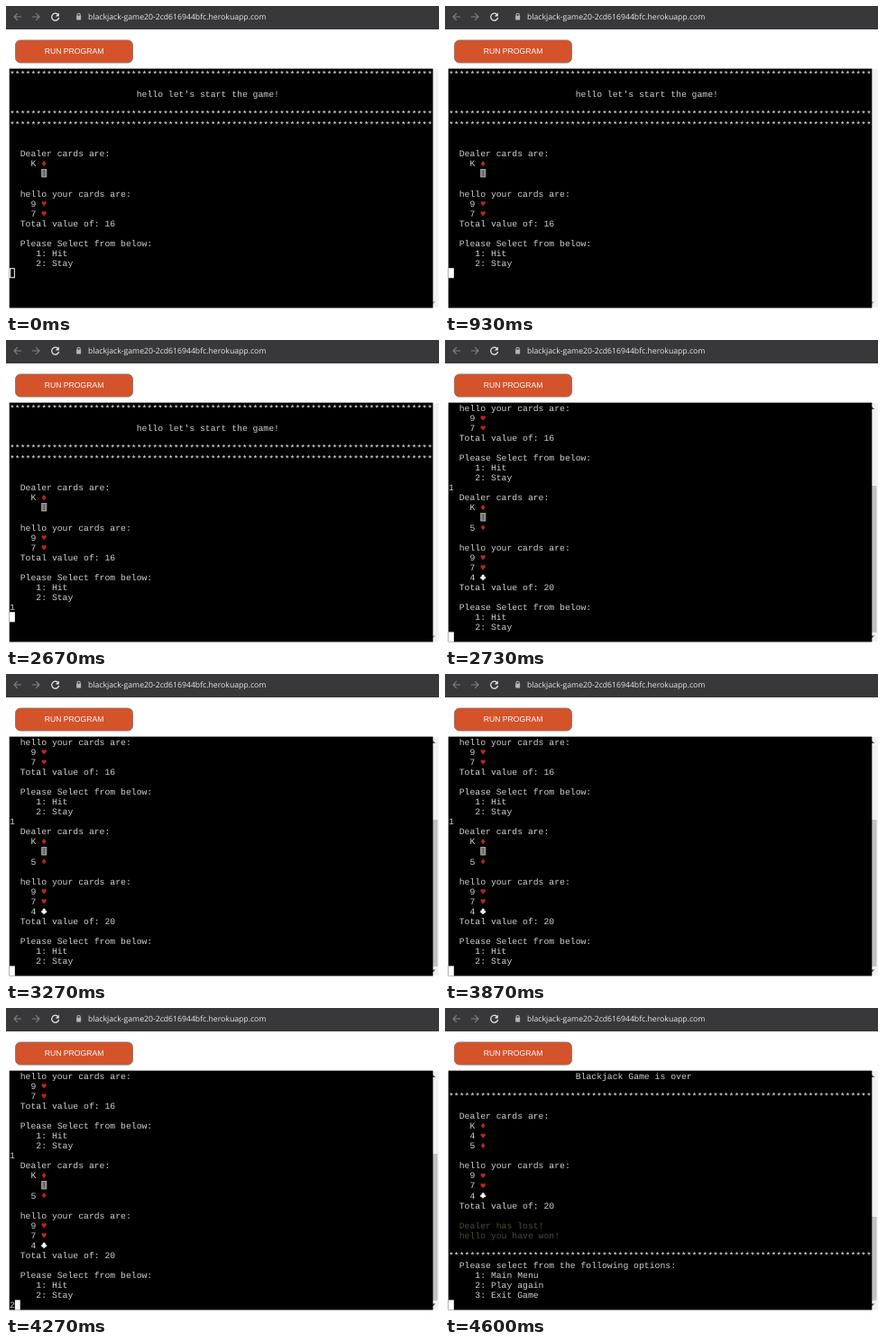
Recreate the animation shown at these times as an HTML page. Size 480 by 340 pixels, loop 7140 ms.

```html
<!DOCTYPE html>
<html lang="en">
<head>
<meta charset="utf-8">
<title>Blackjack</title>
<style>
  html, body { margin: 0; width: 100%; height: 100%; overflow: hidden; background: #fff; }
  svg { display: block; width: 480px; height: 340px; }
  text { text-rendering: geometricPrecision; white-space: pre; }
  .term text { font: 9.77px "Liberation Mono", monospace; fill: #cfcfcf; }
  .term .dim { fill: #4a4937; }
  .term .stars { fill: #eee; }
  .url { font: 8.69px "Open Sans", sans-serif; fill: #e8e8e8; }
  .run { font: 8.65px "Liberation Sans", Arial, sans-serif; fill: #fff; text-anchor: middle; }
</style>
</head>
<body>
<svg viewBox="0 0 480 340">
  <defs>
    <path id="heart" fill="#b9242b" d="M3 8.6 .4 5.6Q-.2 3.5 1.5 3.2 2.6 3.2 3 4.2 3.4 3.2 4.5 3.2 6.2 3.5 5.6 5.6Z"/>
    <path id="diamond" fill="#b9242b" d="M3 2.5 5.4 5.6 3 8.7.6 5.6Z"/>
    <g id="club" fill="#fff">
      <circle cx="3" cy="4.1" r="1.55"/><circle cx="1.5" cy="6.1" r="1.55"/><circle cx="4.5" cy="6.1" r="1.55"/>
      <path d="M2.6 5.3h.8l.7 3.4H1.9Z"/>
    </g>
    <g id="back">
      <rect x=".5" y=".9" width="5.2" height="8.6" fill="#858585" stroke="#adadad" stroke-width=".8"/>
      <path d="M3.1 2.2v6.2" stroke="#484848" stroke-width="1.3" stroke-dasharray="1.2 .6"/>
    </g>
  </defs>

  <rect width="480" height="26" fill="#38383a"/>
  <g fill="none" stroke-width="1.1">
    <path d="M17 12H9M12.8 8.2 9 12l3.8 3.8M29 12h8M33.2 8.2 37 12l-3.8 3.8" stroke="#808286"/>
    <path d="M57.4 9.2A4 4 0 1 0 58.6 13" stroke="#e4e5e7" stroke-width="1.3"/>
    <path d="M79 11V9.8a1.6 1.6 0 0 1 3.2 0V11" stroke="#b4b5b8"/>
  </g>
  <path d="M58.8 7.6v4h-4Z" fill="#e4e5e7"/>
  <rect x="78.1" y="10.7" width="5" height="4.8" rx=".6" fill="#b4b5b8"/>
  <text class="url" x="91" y="15.2">blackjack-game20-2cd616944bfc.herokuapp.com</text>

  <rect x="10.5" y="38" width="130" height="25.1" rx="5.5" fill="#d4532a" stroke="#8c7468" stroke-width=".9"/>
  <text class="run" x="75.5" y="53.4">RUN PROGRAM</text>

  <rect x="473" y="70" width="6.7" height="265" fill="#f1f1f1"/>
  <rect id="thumb" x="473" width="5.5" fill="#c1c1c1"/>
  <path id="up" d="M473 74v3h3.4Z" fill="#505050"/>
  <path id="down" d="M473 328.5h3.4l-3.4 3Z"/>

  <rect x="3.7" y="69.6" width="469.6" height="265.9" fill="#000"/>
  <g class="term" id="term"></g>
  <rect id="cursor" stroke="#fff"/>
</svg>
<script>
const LOOP = 7140, COL = 5.862, ROW = 11.07, LEFT = 4, TOP = 69.8, BASE = 8.9;
const $ = id => document.getElementById(id);
const term = $('term'), cursor = $('cursor'), thumb = $('thumb');
const suits = { '♥': 'heart', '♦': 'diamond', '♣': 'club', '#': 'back' };

function set(el, attrs) {
  for (const k in attrs) el.setAttribute(k, attrs[k]);
  return el;
}

function add(parent, tag, attrs, text = '') {
  const el = set(document.createElementNS('http://www.w3.org/2000/svg', tag), attrs);
  el.textContent = text;
  return parent.appendChild(el);
}

const stars = '*'.repeat(80);
const centre = s => ' '.repeat(24) + s;
const cards = s => s.split(' ').map(c => c === '#' ? '      #' : `    ${c[0]} ${c[1]}`);
const dealer = s => ['  Dealer cards are:', ...cards(s), ''];
const player = (s, total) => ['  hello your cards are:', ...cards(s), `  Total value of: ${total}`, ''];
const menu = ['  Please Select from below:', '     1: Hit', '     2: Stay'];

const screens = [
  [stars, '', centre("hello let's start the game!"), '', stars, stars, '', '',
    ...dealer('K♦ #'), ...player('9♥ 7♥', 16), ...menu],
  [...player('9♥ 7♥', 16), ...menu, '1',
    ...dealer('K♦ # 5♦'), ...player('9♥ 7♥ 4♣', 20), ...menu],
  [centre('Blackjack Game is over'), '', stars, '',
    ...dealer('K♦ 4♥ 5♦'), ...player('9♥ 7♥ 4♣', 20),
    '~  Dealer has lost!', '~  hello you have won!', '', stars,
    '  Please select from the following options:',
    '     1: Main Menu', '     2: Play again', '     3: Exit Game']
].map(lines => {
  const g = add(term, 'g', {});
  lines.forEach((raw, row) => {
    const style = raw === stars ? 'stars' : raw[0] === '~' ? 'dim' : '';
    const line = raw.replace('~', '');
    const y = TOP + row * ROW;
    const text = line.replace(/[♥♦♣#]/, (s, i) => {
      add(g, 'use', { href: '#' + suits[s], x: LEFT + i * COL, y });
      return '';
    }).trimEnd();
    const indent = text.length - text.trimStart().length;
    const drop = style === 'stars' ? 0.5 : 0;
    if (text) add(g, 'text', { x: LEFT + indent * COL, y: y + BASE + drop, class: style }, text.trim());
  });
  return g;
});
const typed = add(term, 'text', { x: LEFT });

// time, screen, cursor column, cursor row, typed key, key row
const steps = [
  [0, 0, 0, 20, '', 20],
  [930, 0, 0, 20, '', 20],
  [1530, 0, 1, 20, '1', 20],
  [2670, 0, 0, 21, '1', 20],
  [2730, 1, 0, 23, '', 23],
  [4200, 1, 1, 23, '2', 23],
  [4600, 2, 0, 23, '', 23]
];
const thumbs = [[0, 0], [162, 163], [232, 93]];

function draw(t) {
  const [time, screen, col, row, key, keyRow] = steps.findLast(s => s[0] <= t);
  const hollow = time === 0;
  const inset = hollow ? 0.5 : 0;
  screens.forEach((g, i) => g.style.display = i === screen ? '' : 'none');
  typed.textContent = key;
  set(typed, { y: TOP + keyRow * ROW + BASE });
  set(cursor, {
    x: LEFT + col * COL + inset, y: TOP + row * ROW + inset,
    width: COL - 2 * inset, height: ROW - 2 * inset,
    fill: hollow ? 'none' : '#fff', 'stroke-width': hollow ? 1 : 0
  });
  set(thumb, { y: thumbs[screen][0], height: thumbs[screen][1] });
  $('up').style.display = screen ? '' : 'none';
  $('down').style.fill = screen ? '#505050' : '#a3a3a3';
}

const start = performance.now();
function tick() {
  draw((performance.now() - start) % LOOP);
  requestAnimationFrame(tick);
}
tick();
</script>
</body>
</html>
```
